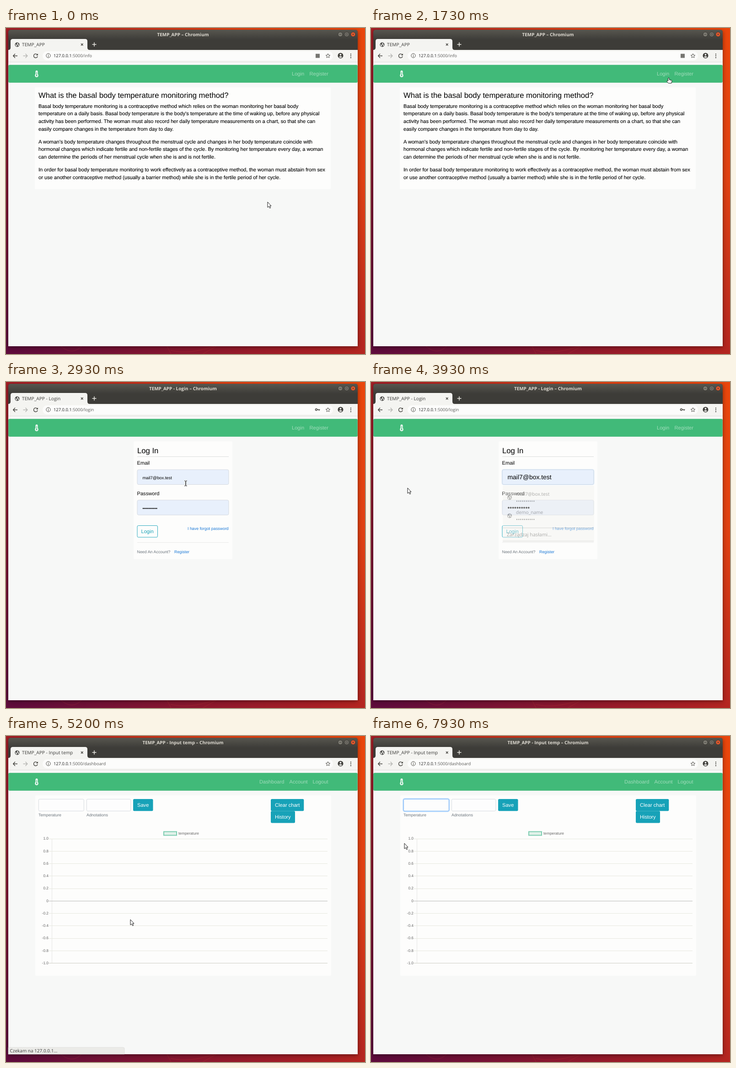
Write an HTML page that moves like this. It is 785x714 px and loops after 8000 ms.

```html
<!DOCTYPE html>
<html lang="en">
<head>
<meta charset="utf-8">
<title>TEMP_APP</title>
<style>
html, body { margin: 0; width: 100%; height: 100%; overflow: hidden; }
svg { display: block; }
text { font: 11.14px "Liberation Sans", Arial, sans-serif; white-space: pre; text-rendering: geometricPrecision; }
.ui { font-family: "Open Sans", "Noto Sans", sans-serif; font-size: 10.2px; fill: #3c3c3a; }
.title { font-family: "Open Sans", "Noto Sans", sans-serif; font-size: 9.95px; font-weight: 700; fill: #dfdbd2; text-anchor: middle; }
.url { font-family: "Open Sans", "Noto Sans", sans-serif; font-size: 9.4px; fill: #5c5c5a; }
.url tspan { fill: #1e1e1e; }
.h { font-size: 16.7px; }
.body { stroke: #000; stroke-width: .12; }
.nav { fill: #a0dcbb; }
.small { font-size: 8.9px; fill: #6c757d; }
.link { font-size: 8.9px; fill: #1877d6; }
.auto { font-size: 9.3px; }
.big { font-size: 13.93px; }
.tick { font-size: 8.35px; fill: #666; }
.end { text-anchor: end; }
.white { fill: #fff; }
.panel { fill: #fdfdfc; }
.field { fill: #fdfdfd; stroke: #ced4da; stroke-width: .8; }
.filled { fill: #e8f0fc; }
.btn { fill: #17a2b8; }
.border { fill: none; stroke: #80bdff; stroke-width: 1; }
.glow { fill: none; stroke: #007bff; stroke-opacity: .25; stroke-width: 2.2; }
.line { fill: none; stroke: #45443f; stroke-width: 1.4; }

.info, .login, .dash, .before, .after, .popup, .ring, .status, .focus, .arrow, .hand, .beam, .cursor {
  animation: 8s step-end infinite;
}
.info { animation-name: info; }
.login { animation-name: login; }
.dash { animation-name: dash; }
.before { animation-name: before; }
.after { animation-name: after; }
.popup { animation-name: popup; animation-timing-function: linear; }
.ring { animation-name: ring; animation-timing-function: linear; }
.status { animation-name: status; }
.focus { animation-name: focus; }
.arrow { animation-name: arrow; }
.hand { animation-name: hand; }
.beam { animation-name: beam; }
.cursor { animation-name: move; animation-timing-function: ease-in-out; }

@keyframes info { 0% { opacity: 1 } 26.625%, 100% { opacity: 0 } }
@keyframes login { 0% { opacity: 0 } 26.625% { opacity: 1 } 61.625%, 100% { opacity: 0 } }
@keyframes dash { 0% { opacity: 0 } 61.625%, 100% { opacity: 1 } }
@keyframes before { 0% { opacity: 1 } 40%, 100% { opacity: 0 } }
@keyframes after { 0% { opacity: 0 } 40%, 100% { opacity: 1 } }
@keyframes popup { 0%, 39.99% { opacity: 0 } 40%, 47.5% { opacity: 1 } 50.375%, 100% { opacity: 0 } }
@keyframes ring { 0%, 39.99% { opacity: 0 } 40%, 47.5% { opacity: 1 } 49.5%, 100% { opacity: 0 } }
@keyframes status { 0% { opacity: 0 } 61.625% { opacity: 1 } 67.5%, 100% { opacity: 0 } }
@keyframes focus { 0% { opacity: 0 } 87.5%, 100% { opacity: 1 } }
@keyframes arrow {
  0% { opacity: 1 } 19.125% { opacity: 0 } 30% { opacity: 1 } 35% { opacity: 0 } 42.5% { opacity: 1 }
  55% { opacity: 0 } 61.625% { opacity: 1 } 82.5% { opacity: 0 } 90%, 100% { opacity: 1 }
}
@keyframes hand {
  0% { opacity: 0 } 19.125% { opacity: 1 } 30% { opacity: 0 } 55% { opacity: 1 } 61.625%, 100% { opacity: 0 }
}
@keyframes beam {
  0% { opacity: 0 } 35% { opacity: 1 } 42.5% { opacity: 0 } 82.5% { opacity: 1 } 90%, 100% { opacity: 0 }
}
@keyframes move {
  0%, 6.625% { transform: translate(572px, 381px) }
  21.625% { transform: translate(651px, 109px) }
  24.125%, 28% { transform: translate(643px, 103px) }
  36.625% { transform: translate(393px, 222px) }
  39%, 40.5% { transform: translate(391px, 212px) }
  47.5%, 50.375% { transform: translate(80px, 232px) }
  56.625%, 60% { transform: translate(310px, 328px) }
  65%, 70% { transform: translate(272px, 402px) }
  85%, 88% { transform: translate(138px, 152px) }
  98%, 100% { transform: translate(73px, 235px) }
}
</style>
</head>
<body>
<svg width="785" height="714" viewBox="0 0 785 714">
  <defs>
    <linearGradient id="wall" gradientUnits="userSpaceOnUse" x1="20" y1="700" x2="765" y2="20">
      <stop offset="0" stop-color="#5f0b3b"/>
      <stop offset=".5" stop-color="#ab2023"/>
      <stop offset=".8" stop-color="#df4012"/>
      <stop offset="1" stop-color="#e9460c"/>
    </linearGradient>
    <linearGradient id="bar" x2="0" y2="1">
      <stop offset="0" stop-color="#57564f"/>
      <stop offset="1" stop-color="#3d3c38"/>
    </linearGradient>
    <filter id="soft" x="-5%" y="-5%" width="110%" height="110%"><feGaussianBlur stdDeviation="5"/></filter>
    <g id="globe">
      <circle r="5" fill="#4c4c4a"/>
      <path d="M-3.8-1.2L-1.5.2-.3 2.2-1 4C-3 3.3-4 1.5-3.8-1.2ZM.2-4L2.6-3 1.2-.8 3.9.2C3.7 2 3 3 2.2 3.3L1.7 1.2-.6-.4Z" fill="#f1f1ee"/>
    </g>
  </defs>

  <rect width="785" height="714" fill="url(#wall)"/>
  <path d="M120 697Q145 718 165 697M352 697L361 714M360 706Q400 716 455 697M430 714L460 697" fill="none" stroke="#e0503a" stroke-opacity=".2"/>
  <rect x="5" y="7" width="764" height="692" fill="#000" opacity=".45" filter="url(#soft)"/>

  <!-- browser window -->
  <rect x="5" y="4" width="764" height="60" rx="5" fill="#3d3c38"/>
  <rect x="5" y="4" width="764" height="22" rx="5" fill="url(#bar)"/>
  <rect x="5" y="48" width="764" height="649" fill="#f7f8f7"/>
  <rect x="5" y="48" width="764" height="27" fill="#f4f4f1"/>
  <path d="M5 48Q10 48 10 43V29Q10 24 15 24H173Q178 24 178 29V43Q178 48 183 48Z" fill="#f4f4f1"/>
  <rect x="80" y="51" width="635" height="20" rx="10" fill="#fcfcfb"/>
  <path d="M5 74.5H769" stroke="#dededb"/>
  <g stroke="#33322e" stroke-width=".8">
    <circle cx="731" cy="14" r="5" fill="#7d7b72"/>
    <circle cx="745" cy="14" r="5" fill="#7d7b72"/>
    <circle cx="759" cy="14" r="5" fill="#ea5a2d"/>
    <path d="M728.5 14H733.5M743 12H747V16H743ZM757 12L761 16M761 12L757 16" fill="none"/>
  </g>
  <use href="#globe" x="24.5" y="36.5"/>
  <path class="line" d="M164 34L168.5 38.5M168.5 34L164 38.5"/>
  <path d="M188.5 36H197.5M193 31.5V40.5" stroke="#eceae4" stroke-width="1.5"/>
  <path class="line" d="M25 61H16M20 56.5L15.7 61 20 65.5"/>
  <path class="line" d="M37.5 61H46.5M42.5 56.5L46.8 61 42.5 65.5" style="stroke:#b5b5b2"/>
  <path class="line" d="M68 58A4.3 4.3 0 1 0 69 62"/>
  <path d="M69.8 56V60H65.8Z" fill="#45443f"/>
  <circle class="line" cx="92.5" cy="60.5" r="4.6" style="stroke-width:1"/>
  <path class="line" d="M92.5 60V63.2M92.5 57.7V59" style="stroke-width:1.1"/>
  <path d="M704 56.2L705.3 59.3 708.7 59.6 706.1 61.8 706.9 65.1 704 63.3 701.1 65.1 701.9 61.8 699.3 59.6 702.7 59.3Z" fill="none" stroke="#55544f"/>
  <circle cx="731.5" cy="60.5" r="6" fill="#3f3e3a"/>
  <circle cx="731.5" cy="58.5" r="1.9" fill="#f3f3f0"/>
  <path d="M727.8 63.5Q731.5 60 735.2 63.5Q731.5 66.5 727.8 63.5" fill="#f3f3f0"/>
  <path d="M754 56.3V66" stroke="#45443f" stroke-width="2" stroke-dasharray="2 1.8"/>

  <!-- page header -->
  <rect x="5.5" y="81" width="763" height="38.5" rx="2" fill="#41ba79" stroke="#3eb074" stroke-width=".5"/>
  <path d="M67 95.5V104" stroke="#f4fbf7" stroke-width="5" stroke-linecap="round"/>
  <circle cx="67" cy="104" r="3.7" fill="#f4fbf7"/>
  <path d="M67 96.5V104" stroke="#41ba79" stroke-width="1.2"/>
  <circle cx="67" cy="104" r="1.5" fill="#41ba79"/>

  <g class="info">
    <text class="title" x="387" y="17.5">TEMP_APP – Chromium</text>
    <text class="ui" x="35" y="40">TEMP_APP</text>
    <text class="url" x="104" y="64"><tspan>127.0.0.1</tspan>:5000/info</text>
    <rect x="677" y="56.5" width="9" height="9" fill="#777672"/>
    <text class="nav" x="625" y="104">Login</text>
    <text class="nav" x="663.5" y="104">Register</text>
    <rect class="panel" x="63" y="130" width="647" height="223" rx="2"/>
    <text class="h" x="71" y="153">What is the basal body temperature monitoring method?</text>
    <text class="body" y="174.6"><tspan x="71">Basal body temperature monitoring is a contraceptive method which relies on the woman monitoring her basal body</tspan><tspan x="71" dy="16.7">temperature on a daily basis. Basal body temperature is the body’s temperature at the time of waking up, before any physical</tspan><tspan x="71" dy="16.7">activity has been performed. The woman must also record her daily temperature measurements on a chart, so that she can</tspan><tspan x="71" dy="16.7">easily compare changes in the temperature from day to day.</tspan><tspan x="71" dy="27.85">A woman’s body temperature changes throughout the menstrual cycle and changes in her body temperature coincide with</tspan><tspan x="71" dy="16.7">hormonal changes which indicate fertile and non-fertile stages of the cycle. By monitoring her temperature every day, a woman</tspan><tspan x="71" dy="16.7">can determine the periods of her menstrual cycle when she is and is not fertile.</tspan><tspan x="71" dy="27.85">In order for basal body temperature monitoring to work effectively as a contraceptive method, the woman must abstain from sex</tspan><tspan x="71" dy="16.7">or use another contraceptive method (usually a barrier method) while she is in the fertile period of her cycle.</tspan></text>
  </g>

  <g class="login">
    <text class="title" x="387" y="17.5">TEMP_APP - Login – Chromium</text>
    <text class="ui" x="35" y="40">TEMP_APP - Login</text>
    <text class="url" x="104" y="64"><tspan>127.0.0.1</tspan>:5000/login</text>
    <circle class="line" cx="678.5" cy="60.5" r="2"/>
    <path class="line" d="M680.5 60.5H686.5M684.5 60.5V63"/>
    <text class="nav" x="625" y="104">Login</text>
    <text class="nav" x="663.5" y="104">Register</text>
    <rect class="panel" x="279" y="130" width="216" height="258" rx="2"/>
    <text class="h" x="287" y="156">Log In</text>
    <path d="M287 163.5H487" stroke="#dadcdd"/>
    <text x="286.5" y="181">Email</text>
    <rect class="field filled" x="287" y="192" width="200" height="32.5" rx="3"/>
    <text x="286.5" y="248">Password</text>
    <rect class="field filled" x="287" y="258.7" width="200" height="32.5" rx="3"/>
    <g class="before">
      <text class="auto" x="298.5" y="213">mail7@box.test</text>
      <text class="auto" x="298.5" y="279.5">••••••••••</text>
    </g>
    <g class="after">
      <text class="big" x="298.5" y="213">mail7@box.test</text>
      <text class="big" x="298.5" y="279.5">••••••••••</text>
    </g>
    <rect x="287" y="314.5" width="44.5" height="25.5" rx="2.5" fill="none" stroke="#17a2b8" stroke-width=".9"/>
    <text x="295.5" y="331" style="fill:#17a2b8">Login</text>
    <text class="link" x="397" y="323.7">I have forgot password</text>
    <path d="M287 351.5H487" stroke="#e9e9e8"/>
    <text class="small" x="286.5" y="375">Need An Account?</text>
    <text class="link" x="368" y="375">Register</text>
    <g class="ring">
      <rect class="glow" x="286" y="191" width="202" height="34.5" rx="4"/>
      <rect class="border" x="287" y="192" width="200" height="32.5" rx="3"/>
    </g>
    <g class="popup">
      <rect x="288" y="227" width="199.5" height="122" fill="#f2f1ee"/>
      <path d="M288 319.5H487M288 348.7H487" stroke="#a5a5a2"/>
      <use href="#globe" x="303" y="253"/>
      <use href="#globe" x="303" y="293"/>
      <text class="ui" x="317" y="249">mail7@box.test</text>
      <text class="ui" x="317" y="265" style="font-size:11px">••••••••••</text>
      <text class="ui" x="317" y="289">demo_name</text>
      <text class="ui" x="317" y="305" style="font-size:11px">••••••••••</text>
      <text class="ui" x="297" y="338" style="font-size:10.7px">Zarządzaj hasłami…</text>
    </g>
  </g>

  <g class="dash">
    <text class="title" x="387" y="17.5">TEMP_APP - Input temp – Chromium</text>
    <text class="ui" x="35" y="40">TEMP_APP - Input temp</text>
    <text class="url" x="104" y="64"><tspan>127.0.0.1</tspan>:5000/dashboard</text>
    <text class="nav" x="554" y="104">Dashboard</text>
    <text class="nav" x="619.5" y="104">Account</text>
    <text class="nav" x="670.5" y="104">Logout</text>
    <rect class="panel" x="64" y="130" width="647" height="395" rx="2"/>
    <rect class="field" x="71.3" y="138.3" width="99" height="26" rx="2.5"/>
    <rect class="field" x="176.3" y="138.3" width="96.5" height="26" rx="2.5"/>
    <g class="focus">
      <rect class="glow" x="70.3" y="137.3" width="101" height="28" rx="3.5"/>
      <rect class="border" x="71.3" y="138.3" width="99" height="26" rx="2.5"/>
    </g>
    <text class="small" x="71" y="176">Temperature</text>
    <text class="small" x="176" y="176">Adnotations</text>
    <rect class="btn" x="278" y="138" width="43.5" height="26.3" rx="2.5"/>
    <rect class="btn" x="579" y="138" width="72.3" height="26.3" rx="2.5"/>
    <rect class="btn" x="579" y="164.3" width="53" height="26.3" rx="2.5"/>
    <text class="white" x="287" y="154.7">Save</text>
    <text class="white" x="588" y="154.7">Clear chart</text>
    <text class="white" x="588" y="181">History</text>
    <rect x="345" y="209.5" width="28" height="8" fill="#e1f1e9" stroke="#7dcdb1" stroke-width="2"/>
    <text class="tick" x="377" y="216">temperature</text>
    <path d="M100.5 225V498" stroke="#e6e6e4"/>
    <g id="grid"></g>
    <g class="status">
      <path d="M5 682H256Q259 682 259 685V697H5Z" fill="#ebebe8" stroke="#d9d9d6" stroke-width=".7"/>
      <text class="ui" x="8.5" y="693" style="font-size:10px">Czekam na 127.0.0.1…</text>
    </g>
  </g>

  <g class="cursor" stroke-linejoin="round">
    <path class="arrow" d="M0 0V12L2.8 9.5 4.8 13.7 6.7 12.8 4.8 8.7H8Z" fill="#fff" stroke="#1c1c1c"/>
    <path class="hand" d="M-1.3 7V1Q0-.6 1.3 1V4.5L6 5.5Q7.3 6 7 7.5L5.8 12H-.5L-4.4 7.8Q-4.2 6.3-2.7 6.5Z" fill="#fff" stroke="#1c1c1c"/>
    <g class="beam" fill="none">
      <path d="M-2.5-5.5H2.5M-2.5 5.5H2.5M0-5.5V5.5" stroke="#fff" stroke-width="3"/>
      <path d="M-2.5-5.5H-.8M.8-5.5H2.5M-2.5 5.5H-.8M.8 5.5H2.5M0-5V5" stroke="#222" stroke-width="1.5"/>
    </g>
  </g>
</svg>
<script>
// Chart grid: eleven ticks from 1.0 down to -1.0
const rows = Array.from({ length: 11 }, (_, i) => {
  const value = 1 - i / 5;
  const y = 225 + i * 27.27;
  const label = i === 5 ? "0" : value.toFixed(1);
  const color = i === 5 ? "#b9bab8" : i === 10 ? "#cdcec4" : "#e7e8df";
  const lineY = Math.floor(y) + 0.5;
  return `<path d="M93.5 ${lineY}H703" stroke="${color}"/>
    <text class="tick end" x="93" y="${y + 2.3}">${label}</text>`;
});
document.getElementById("grid").innerHTML = rows.join("");
</script>
</body>
</html>
```
